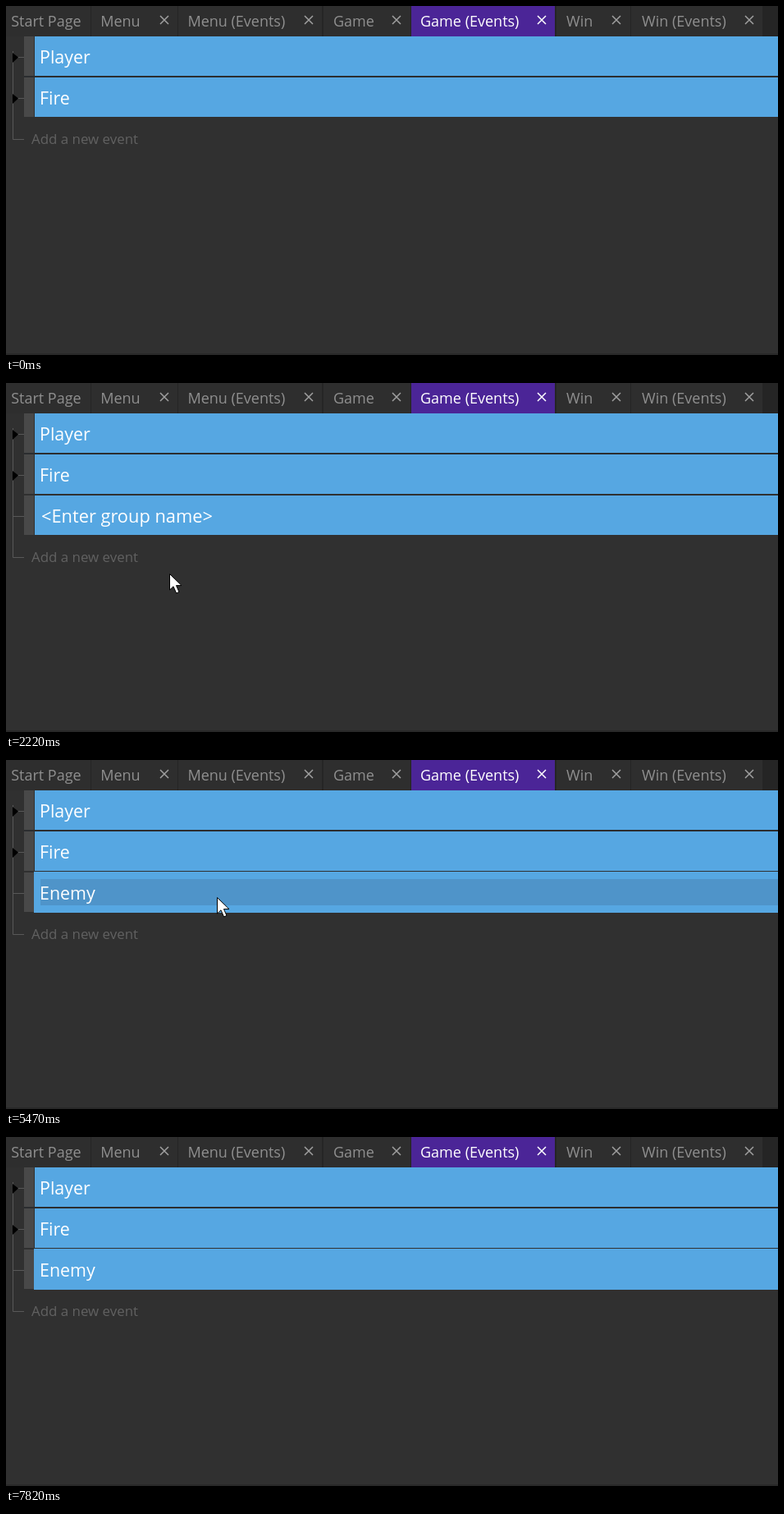
An HTML page that plays this animation: 941 by 425 pixels, repeating every 8.42 s.

```html
<!DOCTYPE html>
<html lang="en">
<head>
<meta charset="utf-8">
<title>Adding an event group</title>
<style>
  html, body { margin: 0; width: 100%; height: 100%; overflow: hidden; background: #303030; }
  svg { display: block; width: 941px; height: 425px; }
  text { font-family: "Open Sans", "Noto Sans", sans-serif; white-space: pre; }
  .tab { font-size: 18px; fill: #8f8f8f; }
  .tab.on { fill: #fff; }
  .close { stroke: #a0a0a0; stroke-width: 1.5; fill: none; }
  .close.on { stroke: #fff; }
  .name { font-size: 21.4px; font-weight: 500; fill: #fff; }
  .hint { font-size: 21.8px; fill: #fff; }
  .faint { fill: #b4d8f3; }
  .typed { font-size: 21px; fill: #fff; }
  .add { font-size: 16.9px; fill: #616161; }
  .item { font-size: 14.4px; fill: #f1f1f1; }
  .bar { fill: #56a7e2; }
  .grip { fill: #494949; }
  .tree { stroke: #585858; fill: none; }
</style>
</head>
<body>
<svg viewBox="0 0 941 425">
  <rect width="941" height="425" fill="#303030"/>
  <rect y="423" width="941" height="2" fill="#292929"/>
  <g id="tabs"><rect width="941" height="37" fill="#252525"/></g>

  <path id="stem" class="tree"/>
  <path class="tree" d="M14 62.5H22M14 112.5H22"/>
  <path d="M8 57L15 62.5L8 69ZM8 107L15 112.5L8 119Z" fill="#000"/>
  <path d="M22 37h12v48h-12zM22 87h12v48h-12z" class="grip"/>
  <path d="M35 37H941V85H35zM35 87H941V135H35z" class="bar"/>
  <path d="M22 86H941" stroke="#262a2e"/>
  <text class="name" x="41" y="70">Player</text>
  <text class="name" x="41" y="120">Fire</text>

  <g id="group">
    <rect class="grip" x="22" y="137" width="12" height="48"/>
    <rect id="row" class="bar" x="35" y="137" width="907" height="48"/>
    <rect id="hover" x="42" y="145" width="899" height="32" fill="#4f94c9"/>
    <text id="blank" class="hint" x="43" y="170">&lt;Enter group name&gt;</text>
    <text id="final" class="name" x="41" y="170">Enemy</text>
    <g id="field">
      <rect x="42" y="137" width="899" height="48" fill="#66b0e5"/>
      <text id="prompt" class="hint faint" x="57.5" y="169">&lt;Enter group name&gt;</text>
      <text id="typed" class="typed" x="56" y="169"></text>
      <rect id="caret" y="145" width="1" height="30" fill="#fff"/>
    </g>
  </g>

  <g id="add">
    <text class="add" x="31" y="168">Add a new event</text>
    <rect id="ring" x="31.5" y="148.5" width="130" height="24" rx="1" fill="none" stroke="#65512a" stroke-width="1.5"/>
  </g>

  <g id="menu">
    <rect x="99" y="174" width="165" height="250" fill="#000" opacity=".35"/>
    <rect x="96.5" y="171.5" width="165" height="250" fill="#292a2d" stroke="#3d3e41"/>
    <rect id="pick" x="97" width="164" height="30" fill="#4b4c4f"/>
  </g>

  <g id="cursor">
    <path id="arrow" d="M.5 .5V20L5 15.8L8.6 24L12 22.5L8.5 14.6H15Z" fill="#fff" stroke="#000" stroke-linejoin="round"/>
    <path id="hand" d="M-1.5 13V1Q0 -2 2 1V8Q4 6 5.5 8.5Q8 7 9 9.5Q12 8.5 12.5 11V16Q12 19 10 21V23H0V21L-6 13Q-5 10 -1.5 13Z" fill="#fff" stroke="#000"/>
    <path id="beam" d="M-3 -7.5H-.8L0 -6.8L.8 -7.5H3M0 -7V7M-3 7.5H-.8L0 6.8L.8 7.5H3" fill="none" stroke="#3d3a38" stroke-width="1.2"/>
  </g>
</svg>
<script>
const LOOP = 8420;
const $ = id => document.getElementById(id);
const show = (id, on) => { $(id).style.display = on ? '' : 'none'; };

function draw(parent, tag, attrs, text) {
  const el = document.createElementNS('http://www.w3.org/2000/svg', tag);
  for (const key in attrs) el.setAttribute(key, attrs[key]);
  if (text) el.textContent = text;
  return $(parent).appendChild(el);
}

// label, left edge, right edge, text x, close button x
const tabs = [
  ['Start Page', 0, 103, 6.2],
  ['Menu', 104, 209, 115.2, 193],
  ['Menu (Events)', 210, 385, 221.4, 369],
  ['Game', 387, 493, 399, 476],
  ['Game (Events)', 494, 669, 505, 653],
  ['Win', 671, 761, 683, 744],
  ['Win (Events)', 762, 922, 775, 906]
];
tabs.forEach(([label, left, right, x, close], i) => {
  const on = i === 4;
  const cls = on ? ' on' : '';
  draw('tabs', 'rect', { x: left, width: right - left, height: 37, fill: on ? '#4b2597' : '#2e2e2e' });
  draw('tabs', 'text', { class: 'tab' + cls, x, y: 25 }, label);
  if (close) draw('tabs', 'path', { class: 'close' + cls, d: `M${close - 5} 12l10 10m0 -10l-10 10` });
});

['Comment', 'For each object', 'Group', 'Javascript code', 'Link', 'Repeat', 'Standard event', 'While']
  .forEach((label, i) => draw('menu', 'text', { class: 'item', x: 126.5, y: 197 + 30 * i }, label));

// Pointer route: time, x, y
const route = [
  [0, 569, 425], [30, 556, 416], [250, 235, 290], [430, 20, 195], [580, 70, 144], [710, 70, 144],
  [950, 178, 352], [1130, 185, 349], [1330, 186, 346], [1500, 186, 346],
  [1930, 194, 246], [2070, 194, 246], [2220, 199, 232], [2600, 244, 166],
  [2810, 244, 166], [3060, 257, 166], [3480, 259, 168], [4310, 259, 168],
  [5460, 257, 167], [5840, 257, 167], [5910, 268, 130], [6100, 268, 130],
  [6360, 323, 219], [6970, 741, 350], [7820, 889, 427], [LOOP, 889, 427]
];

function slope(i, axis) {
  const a = route[i - 1], b = route[i], c = route[i + 1];
  if (!a || !c) return 0;
  const before = b[axis] - a[axis], after = c[axis] - b[axis];
  return before * after <= 0 ? 0 : (before + after) / (c[0] - a[0]);
}

function pointer(t) {
  let i = 0;
  while (i < route.length - 2 && t >= route[i + 1][0]) i++;
  const a = route[i], b = route[i + 1], span = b[0] - a[0];
  const u = (t - a[0]) / span, v = 1 - u;
  return [1, 2].map(k =>
    v * v * (1 + 2 * u) * a[k] + u * u * (3 - 2 * u) * b[k] +
    span * u * v * (v * slope(i, k) - u * slope(i + 1, k)));
}

const OPEN = 740, CHOSEN = 2080, SELECT = 2900, EDIT = 3060, COMMIT = 5470;
const keys = [4310, 4650, 4770, 4890, 5010];

function render(t) {
  const [x, y] = pointer(t);
  const made = t >= CHOSEN;
  const editing = t >= EDIT && t < COMMIT;
  const menu = t >= OPEN && t < CHOSEN;
  const typing = t >= keys[0] && t < COMMIT;
  const visible = t >= 30 && t < 7820 && !typing;

  show('group', made);
  $('add').setAttribute('transform', `translate(0 ${made ? 50 : 0})`);
  $('stem').setAttribute('d', made ? 'M8.5 55V212.5H22M8.5 162.5H22' : 'M8.5 55V162.5H22');
  show('ring', t >= 720 && t < CHOSEN);

  show('menu', menu);
  const item = Math.floor((y - 176) / 30);
  show('pick', menu && item >= 0 && x >= 97);
  $('pick').setAttribute('y', 176 + 30 * item);

  const grow = t >= SELECT ? 1 : 0;
  const row = $('row');
  row.setAttribute('x', 35 - grow);
  row.setAttribute('y', 137 - grow);
  row.setAttribute('height', 48 + 2 * grow);
  show('hover', visible && !editing && x >= 42 && y >= 145 && y < 177);
  show('blank', t < EDIT);
  show('final', t >= COMMIT);

  show('field', editing);
  if (editing) {
    const count = keys.filter(k => t >= k).length;
    const typed = $('typed');
    typed.textContent = 'Enemy'.slice(0, count);
    show('prompt', !count);
    show('caret', count || t < 3580 || t >= 4040);
    $('caret').setAttribute('x', count ? Math.round(56 + typed.getComputedTextLength()) - 1 : 57);
  }

  const link = t < 720 && x >= 31 && x < 162 && y >= 142 && y < 173;
  show('cursor', visible);
  show('hand', link);
  show('beam', editing);
  show('arrow', !link && !editing);
  $('cursor').setAttribute('transform', `translate(${Math.round(x)} ${Math.round(y)})`);
}

const start = performance.now();
function tick() {
  render((performance.now() - start) % LOOP);
  requestAnimationFrame(tick);
}
tick();
</script>
</body>
</html>
```
